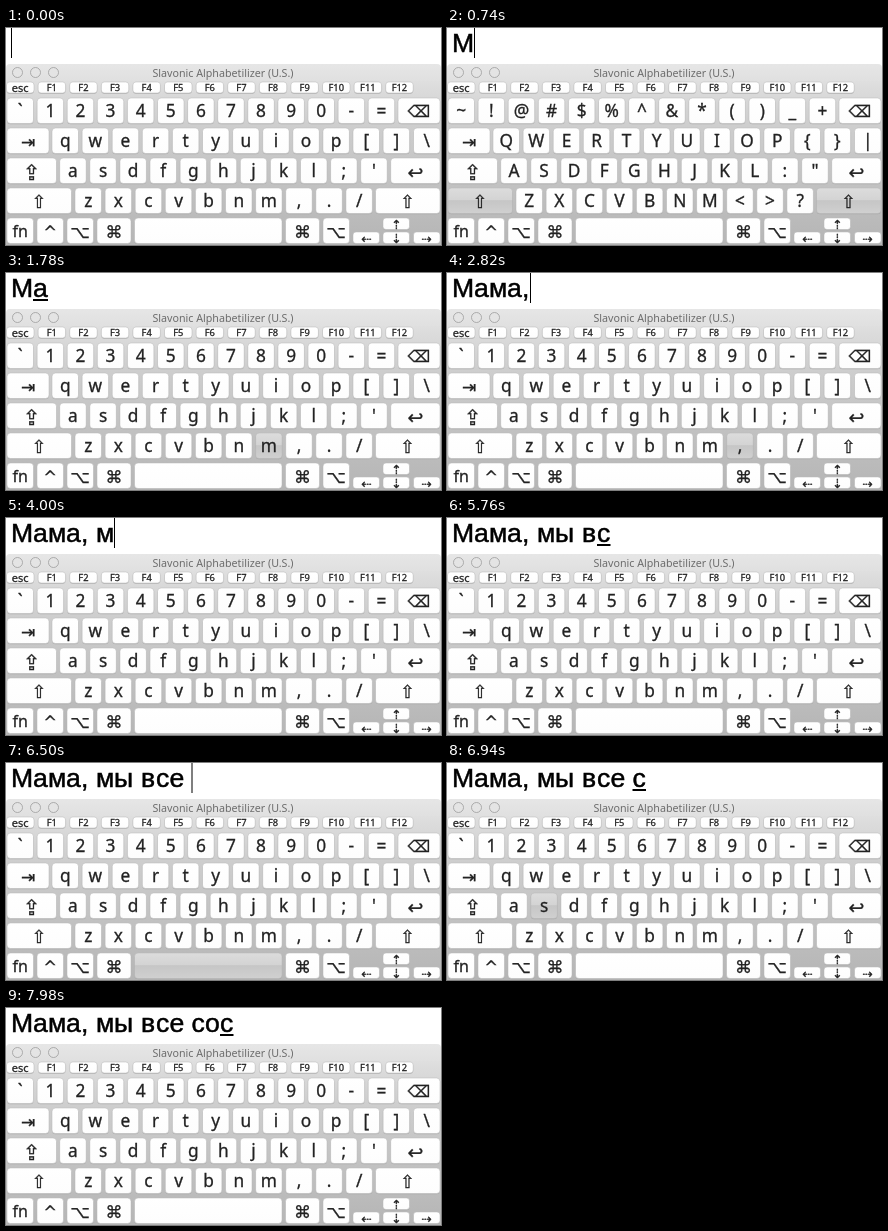
Write an HTML page that moves like this. It is 435 px wide and 217 px high and loops after 8 s.

```html
<!DOCTYPE html>
<html lang="en">
<head>
<meta charset="utf-8">
<title>Typing on a screen keyboard</title>
<style>
html, body { margin: 0; width: 100%; height: 100%; overflow: hidden; background: #fff; }
svg { display: block; width: 435px; height: 217px; }
text { white-space: pre; }
.label { font-family: "Noto Sans", "Open Sans", sans-serif; fill: #222; stroke: #222; stroke-width: .3; text-anchor: middle; }
.sign { font-family: "DejaVu Sans", sans-serif; }
.title { font: 10.7px "Noto Sans", "Open Sans", sans-serif; fill: #6c6c6c; text-anchor: middle; }
.typed { font: 26.6px "Liberation Sans", Arial, sans-serif; fill: #000; stroke: #000; stroke-width: .5; }
</style>
</head>
<body>
<svg id="stage" viewBox="0 0 435 217">
  <defs>
    <linearGradient id="bar" x2="0" y2="1">
      <stop offset="0" stop-color="#e6e6e6"/><stop offset="1" stop-color="#e0e0e0"/>
    </linearGradient>
    <linearGradient id="panel" x2="0" y2="1">
      <stop offset="0" stop-color="#e0e0e0"/><stop offset=".25" stop-color="#cfcfcf"/><stop offset="1" stop-color="#b5b5b5"/>
    </linearGradient>
    <linearGradient id="up" x2="0" y2="1">
      <stop offset="0" stop-color="#fff"/><stop offset="1" stop-color="#fdfdfd"/>
    </linearGradient>
    <linearGradient id="down" x2="0" y2="1">
      <stop offset="0" stop-color="#dcdcdc"/><stop offset=".45" stop-color="#d4d4d4"/>
      <stop offset=".5" stop-color="#c6c6c6"/><stop offset="1" stop-color="#d0d0d0"/>
    </linearGradient>
  </defs>
  <rect y="50" width="435" height="167" fill="url(#panel)"/>
  <path d="M0 53V40Q0 36 4 36H431Q435 36 435 40V53Z" fill="url(#bar)"/>
  <g fill="#e4e4e4" stroke="#a4a4a4" stroke-width=".9">
    <circle cx="11.5" cy="44.5" r="5"/><circle cx="29.5" cy="44.5" r="5"/><circle cx="47.5" cy="44.5" r="5"/>
  </g>
  <text class="title" x="217" y="48.5">Slavonic Alphabetilizer (U.S.)</text>
</svg>
<script>
const LOOP = 8000;
const stage = document.getElementById("stage");
const keys = {};

function add(tag, attrs, parent = stage) {
  const el = document.createElementNS("http://www.w3.org/2000/svg", tag);
  for (const name in attrs) el.setAttribute(name, attrs[name]);
  return parent.appendChild(el);
}

function addKey(id, x, y, w, h, label, size, sign, shifted = label) {
  const rx = h < 15 ? 3 : 3.5;
  add("rect", { x, y: y + 0.8, width: w, height: h, rx, fill: "#999", opacity: 0.6 });
  const cap = add("rect", { x, y, width: w, height: h, rx, stroke: "#b4b4b4", "stroke-width": 0.5 });
  const text = add("text", {
    class: sign ? "label sign" : "label",
    x: x + w / 2, y: y + h / 2 + size * (sign ? 0.42 : 0.37), "font-size": size
  });
  (keys[id] = keys[id] || []).push({ cap, text, label, shifted });
}

const addSign = (id, x, y, w, label, size = 18) => addKey(id, x, y, w, 25.5, label, size, true);

function addRow(x, y, plain, shifted) {
  [...plain].forEach((c, i) => addKey(c, x + i * 30.1, y, 26.5, 25.5, c, 17.3, false, shifted[i]));
}

function buildKeyboard() {
  addKey("esc", 0.5, 54, 27.5, 11, "esc", 11);
  for (let i = 1; i <= 12; i++) addKey("F" + i, 0.5 + 31.6 * i, 54, 27.5, 11, "F" + i, 9.3);

  addRow(1, 70, "`1234567890-=", "~!@#$%^&*()_+");
  addSign("delete", 392, 70, 42, "⌫", 16);

  addSign("tab", 1, 100, 42, "⇥", 17);
  addRow(46, 100, "qwertyuiop[]", "QWERTYUIOP{}");
  addKey("\\", 407.5, 100, 26.5, 25.5, "\\", 17.3, false, "|");

  addSign("caps", 1, 130, 49.5, "⇪", 21);
  addRow(53.7, 130, "asdfghjkl;'", "ASDFGHJKL:\"");
  addSign("return", 384.7, 130, 49.3, "↩", 19);

  addSign("shift", 1, 160, 64.5, "⇧");
  addRow(69, 160, "zxcvbnm,./", "ZXCVBNM<>?");
  addSign("shift", 369.5, 160, 64.5, "⇧");

  addKey("fn", 1, 190, 26.5, 25.5, "fn", 16);
  addSign("ctrl", 31, 190, 26.5, "^", 16);
  addSign("alt", 61, 190, 26.5, "⌥", 17);
  addSign("cmd", 91, 190, 34, "⌘", 17);
  addKey(" ", 128.5, 190, 147.5, 25.5, "", 17.3);
  addSign("cmd", 279.5, 190, 34, "⌘", 17);
  addSign("alt", 317, 190, 26.5, "⌥", 17);
  const arrow = (x, y, label) => addKey(label, x, y, 26.5, 11.5, label, 12.5, true);
  arrow(347, 204, "⇠");
  arrow(377, 190, "⇡");
  arrow(377, 204, "⇣");
  arrow(407.5, 204, "⇢");
}

const MESSAGE = "Мама, мы все сос";
// Left edge of each character, then the end of the line
const STOPS = [5, 27, 42, 60, 75, 83, 90, 108, 127.6, 135, 150, 163.5, 178, 185.5, 199, 214, 227.5];
// Letters that may still combine with the next one
const COMPOSING = /[аыесо]/;

// key, pressed, released, moment the character appears
const STROKES = [
  ["m", 450, 740, 590], ["a", 1180, 1480], ["m", 1780, 2080, 1930], ["a", 2380, 2670],
  [",", 2820, 3120], [" ", 3410, 3560], ["m", 3850, 4000], ["y", 4290, 4590],
  [" ", 4740, 4880], ["v", 5170, 5320], ["s", 5610, 5760], ["e", 6060, 6350],
  [" ", 6500, 6640], ["s", 6940, 7090], ["o", 7240, 7540], ["s", 7690, 7980]
];
const SHIFT = ["shift", 300, 890];

buildKeyboard();
const line = add("text", { class: "typed", x: STOPS.slice(0, -1).join(" "), y: 24 });
const mark = add("rect", { fill: "#000" });

function place(el, x, y, width, height) {
  Object.entries({ x, y, width, height }).forEach(([name, value]) => el.setAttribute(name, value));
}

function render(t) {
  const held = ([, from, to]) => t >= from && t < to;
  const shift = held(SHIFT);
  const pressed = new Set([...STROKES, SHIFT].filter(held).map(s => s[0]));

  for (const id in keys) {
    for (const { cap, text, label, shifted } of keys[id]) {
      cap.setAttribute("fill", pressed.has(id) ? "url(#down)" : "url(#up)");
      text.textContent = shift ? shifted : label;
    }
  }

  const count = STROKES.filter(([, from, , shown = from]) => t >= shown).length;
  line.textContent = MESSAGE.slice(0, count);
  if (count && COMPOSING.test(MESSAGE[count - 1])) {
    const x = STOPS[count - 1];
    place(mark, x, 26, STOPS[count] - x, 2);
  } else {
    place(mark, STOPS[count], 0, 1, 30);
  }
}

const start = performance.now();
function tick() {
  render((performance.now() - start) % LOOP);
  requestAnimationFrame(tick);
}
tick();
</script>
</body>
</html>
```
